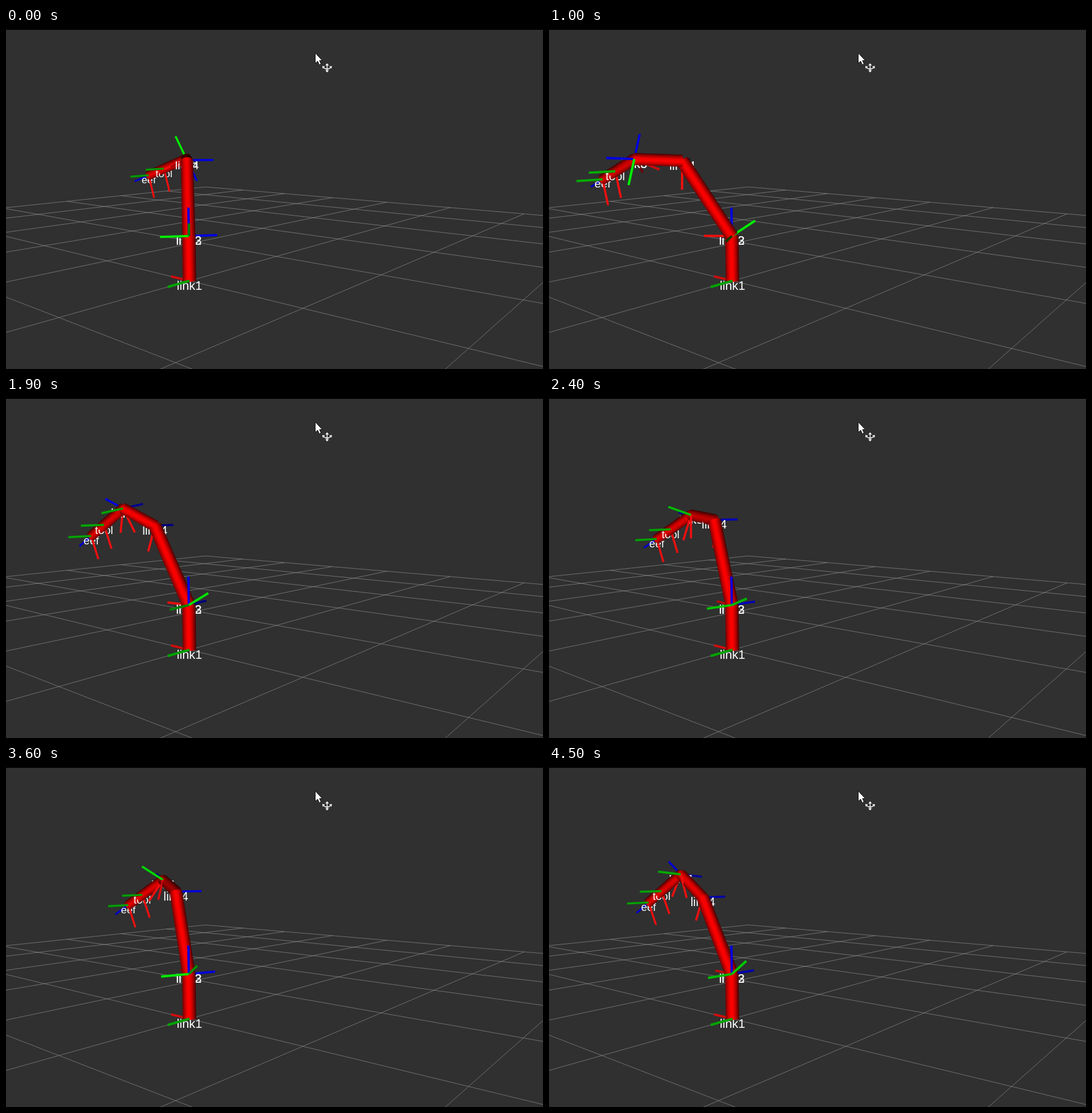
Write an HTML page with a canvas that moves like this. It is 883 by 560 pixels and loops after 5300 ms.

```html
<!DOCTYPE html>
<html>
<head>
<meta charset="utf-8">
<style>
html, body { margin: 0; width: 100%; height: 100%; overflow: hidden; background: #303030; }
canvas { display: block; }
</style>
</head>
<body>
<canvas id="stage" width="883" height="560"></canvas>
<script>
const g = document.getElementById('stage').getContext('2d');
const RED = [240, 15, 15], GREEN = [0, 240, 0], BLUE = [0, 0, 225];
const BASE = .32, UPPER = .625, FORE = .34, TOOL = .49, AXIS = .2;

// where the tool tip passes: time, then x y z in grid cells from the base
const path = [
  [0, .99, -.44, .674],
  [400, .99, -.285, .69],
  [600, 1.01, .245, .687],
  [1100, 1.01, .42, .69],
  [1400, 1.045, .285, .733],
  [2100, 1.06, 0, .78],
  [2400, .995, -.087, .737],
  [3100, .99, -.34, .72],
  [4000, .99, -.138, .782],
  [4500, 1.07, -.062, .78]
];
const holds = [500, 700, 1200, 1500, 2500, 3400, 4100, 4400];

const add = (a, b, k = 1) => a.map((v, i) => v + b[i] * k);
const mix = (a, b, k) => a.map((v, i) => v + (b[i] - v) * k);
const scale = (a, k) => a.map(v => v * k);
const unit = a => scale(a, 1 / Math.hypot(...a));
const cross = (a, b) => [a[1] * b[2] - a[2] * b[1], a[2] * b[0] - a[0] * b[2], a[0] * b[1] - a[1] * b[0]];

// camera: w is proportional to the distance from the eye
function project([x, y, z]) {
  const i = 5 - x, j = 5 + y, ground = 1 - .0566 * i - .0718 * j, w = ground - .0107 * z;
  return { x: (328 + 39.1 * i - 83.1 * j - 4.4 * z) / w, y: (175 * ground + 86 - 86 * z) / w, w };
}

function tipAt(ms) {
  let t = Math.min(4500, Math.floor(ms / 100) * 100);
  if (holds.includes(t)) t -= 100;
  let n = 0;
  while (n < path.length - 2 && t >= path[n + 1][0]) n++;
  const a = path[n], b = path[n + 1];
  return mix(a, b, (t - a[0]) / (b[0] - a[0])).slice(1);
}

// parts wait here until they are painted from far to near
let parts = [];
const later = (w, paint) => parts.push({ w, paint });

// parts that point along the view get less light
function light(a, b) {
  const away = (project(b).w - project(a).w) / .0914 / Math.hypot(...add(b, a, -1));
  return { away: Math.min(1, Math.abs(away)), level: Math.min(1, 1.1 * Math.sqrt(Math.max(.05, 1 - away * away))) };
}

const rgb = (c, k) => `rgb(${c.map(v => Math.round(v * k))})`;

function line(a, b, color, width) {
  g.strokeStyle = color;
  g.lineWidth = width;
  g.beginPath();
  g.moveTo(a.x, a.y);
  g.lineTo(b.x, b.y);
  g.stroke();
}

function axis(o, dir, color) {
  const end = add(o, dir, AXIS), a = project(o), b = project(end);
  later(b.w + .002, () => line(a, b, rgb(color, light(o, end).level), 1.35 / b.w));
}

function label(text, o, drop = 14.5) {
  const p = project(o);
  later(p.w + .005, () => {
    g.font = 7.3 / p.w + 'px "Liberation Sans", Arial, sans-serif';
    g.textAlign = 'center';
    g.fillStyle = '#fff';
    g.fillText(text, p.x, p.y + drop);
  });
}

function tube(from, to, size) {
  const { away, level } = light(from, to);
  for (let n = 0; n < 3; n++) {
    const a = project(mix(from, to, n / 3)), b = project(mix(from, to, (n + 1) / 3));
    later((a.w + b.w) / 2, () => cylinder(a, b, size, Math.max(.15, away), level));
  }
}

function cylinder(a, b, size, squash, level) {
  const r1 = size / a.w, r2 = size / b.w, dx = b.x - a.x, dy = b.y - a.y;
  const shade = g.createLinearGradient(0, -r1, 0, r1);
  [110, 200, 255, 240, 165, 70].forEach((v, n) => shade.addColorStop(n / 5, rgb([v, 0, 0], level)));
  g.save();
  g.translate(a.x, a.y);
  g.rotate(Math.atan2(dy, dx));
  g.fillStyle = shade;
  g.beginPath();
  g.ellipse(0, 0, r1 * squash, r1, 0, Math.PI / 2, Math.PI * 1.5);
  g.ellipse(Math.hypot(dx, dy), 0, r2 * squash, r2, 0, -Math.PI / 2, Math.PI / 2);
  g.fill();
  g.restore();
}

function arm(tip) {
  // the tool keeps its heading, so the wrist follows from the tip
  const dip = .32 + 1.57 * (tip[2] - .674);
  const toolDir = unit([Math.cos(dip), -.1 * tip[1], -Math.sin(dip)]);
  const wrist = add(tip, toolDir, -TOOL), tool = add(tip, toolDir, -.42 * TOOL);

  // elbow from the triangle shoulder, elbow, wrist
  const root = [0, 0, 0], up = [0, 0, 1], shoulder = scale(up, BASE);
  const ahead = unit([wrist[0], wrist[1], 0]), left = cross(up, ahead);
  const r = Math.hypot(wrist[0], wrist[1]), h = wrist[2] - BASE, d = Math.hypot(r, h);
  const bend = Math.acos(Math.min(1, (UPPER ** 2 + d ** 2 - FORE ** 2) / (2 * UPPER * d)));
  const lean = Math.atan2(r, h) - bend;
  const upperDir = add(scale(ahead, Math.sin(lean)), up, Math.cos(lean));
  const elbow = add(shoulder, upperDir, UPPER);
  const foreDir = unit(add(wrist, elbow, -1));
  const hinge = unit(cross(foreDir, toolDir)), right = scale(left, -1);

  axis(root, [1, 0, 0], RED);
  axis(root, [0, 1, 0], GREEN);
  label('link1', root);

  axis(shoulder, ahead, RED);
  axis(shoulder, left, GREEN);
  axis(shoulder, up, BLUE);
  axis(shoulder, cross(right, upperDir), GREEN);
  axis(shoulder, right, BLUE);
  label('link2', shoulder);
  label('link3', shoulder);

  axis(elbow, cross(left, foreDir), RED);
  axis(elbow, right, BLUE);
  label('link4', elbow);

  axis(wrist, cross(hinge, foreDir), RED);
  axis(wrist, cross(hinge, toolDir), RED);
  axis(wrist, hinge, GREEN);
  axis(wrist, scale(hinge, -1), BLUE);
  axis(wrist, foreDir, BLUE);
  label('link5', wrist);
  label('link6', wrist);

  const side = unit(cross(up, toolDir));
  for (const o of [tool, tip]) {
    axis(o, cross(side, toolDir), RED);
    axis(o, side, GREEN);
  }
  axis(tip, toolDir, BLUE);
  label('tool', tool);
  label('eef', tip, 13.5);

  tube(root, shoulder, 3.95);
  tube(shoulder, elbow, 3.85);
  tube(elbow, wrist, 3.5);
  tube(wrist, tip, 3.35);

  parts.sort((a, b) => b.w - a.w).forEach(p => p.paint());
  parts = [];
}

function floor() {
  const node = (i, j) => project([5 - i, j - 5, 0]);
  const color = 'rgba(160,160,164,.55)';
  for (let n = 0; n <= 10; n++) {
    line(node(n, 0), node(n, Math.min(10, (.95 - .0566 * n) / .0718)), color, 1);
    line(node(0, n), node(Math.min(10, (.95 - .0718 * n) / .0566), n), color, 1);
  }
}

function pointer() {
  g.fillStyle = '#fff';
  g.strokeStyle = '#111';
  g.lineWidth = 1;
  const arrow = new Path2D('M508.5 41v17l4-3.5 2.7 6 2.8-1.5-2.5-5.5h4.5z');
  g.fill(arrow);
  g.stroke(arrow);
  g.fill(new Path2D('M528 58l-3 3.5h6zM528 73l-3-3.5h6zM520 62.5l4.5.5-3.5 4zM536 62.5l-4.5.5 3.5 4z'));
  g.strokeStyle = '#fff';
  g.lineWidth = 1.3;
  g.stroke(new Path2D('M528 60v11M522 65q6 5 12 0'));
}

let start;
function frame(now) {
  start ??= now;
  g.fillStyle = '#303030';
  g.fillRect(0, 0, 883, 560);
  floor();
  arm(tipAt((now - start) % 5300));
  g.fillStyle = '#000';
  g.fillRect(0, 0, 883, 3);
  pointer();
  requestAnimationFrame(frame);
}
requestAnimationFrame(frame);
</script>
</body>
</html>
```
